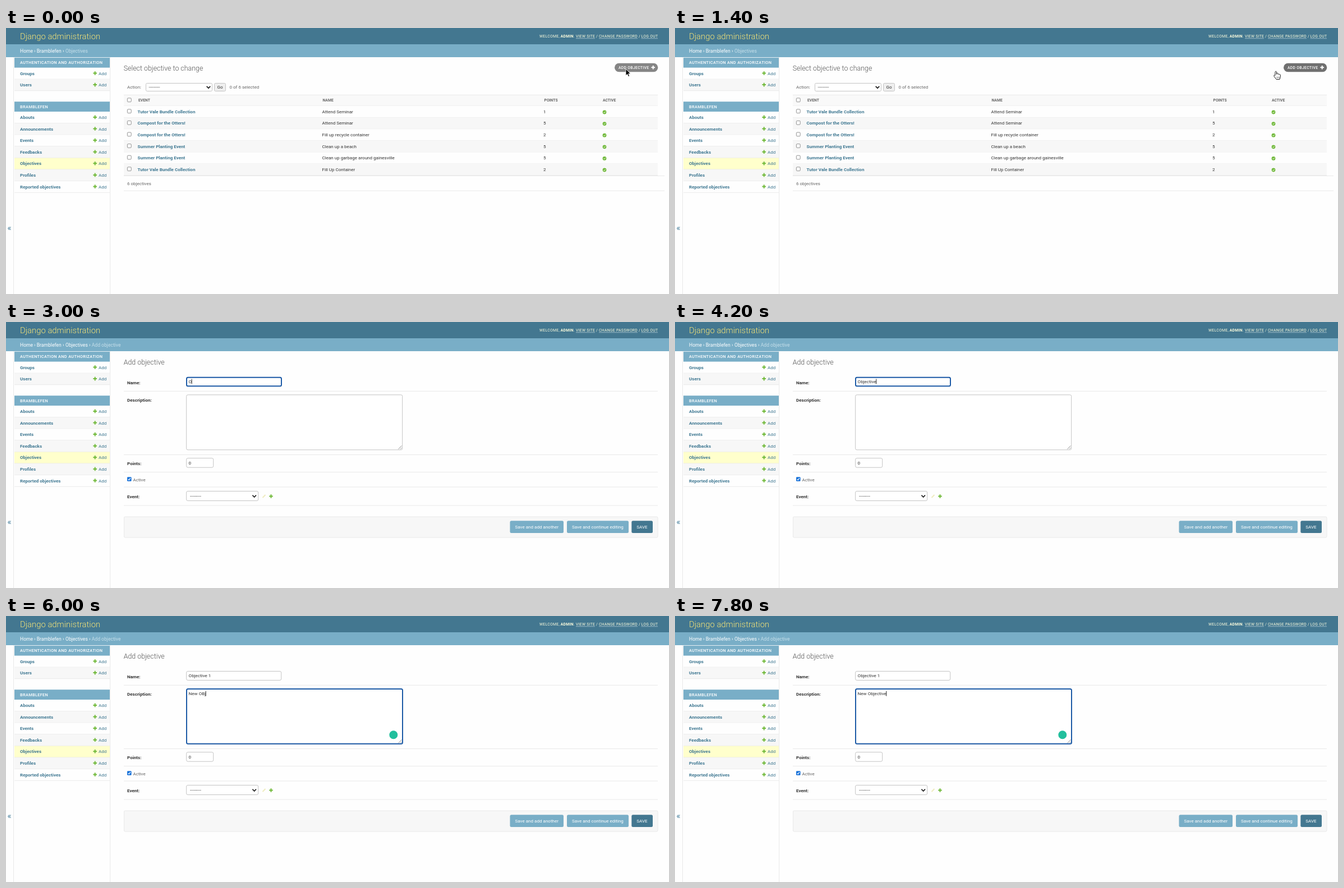
These frames come from a looping animation (1182 by 474 pixels, 8000 ms). An HTML page:

```html
<!DOCTYPE html>
<html lang="en">
<head>
<meta charset="utf-8">
<title>Add objective</title>
<style>
  html, body { margin: 0; width: 100%; height: 100%; overflow: hidden; background: #fefefe; }
  svg { display: block; width: 100%; height: 100%; }
  text { font: 8.05px Roboto, sans-serif; fill: #333; white-space: pre; }
  .bold { font-weight: 700; }
  .link { fill: #3f7892; }
  .gray { fill: #666; }
  .brand { font-size: 14.85px; font-weight: 300; fill: #f5e478; }
  .title { font-size: 12.4px; font-weight: 300; fill: #555; }
  .crumb { font-size: 8.6px; fill: #fff; }
  .faded { fill: #c6dfea; }
  .caption { font-size: 7.4px; font-weight: 500; letter-spacing: .31px; fill: #fff; }
  .user { font-size: 6.8px; letter-spacing: .31px; fill: #ffffdf; }
  .head { font-size: 6.8px; font-weight: 700; fill: #666; }
  .tool { font-size: 6.8px; font-weight: 500; letter-spacing: .31px; fill: #fff; }
  .white { fill: #fff; }
  .toggle { font-size: 15px; fill: #447e9b; }
</style>
</head>
<body>
<svg id="stage" viewBox="0 0 1182 474" preserveAspectRatio="none"></svg>
<script>
const BLUE = '#79aec7', DARK = '#437790', LINE = '#e9e9e9', GREEN = '#70b93a';
const STEP = 200, LOOP = 8000, ROW = 20.6;

const text = (x, y, s, cls = '') => `<text x="${x}" y="${y}" class="${cls}">${s}</text>`;
const box = (x, y, w, h, fill, stroke = 'none', r = 0, extra = '') =>
  `<rect x="${x}" y="${y}" width="${w}" height="${h}" rx="${r}" fill="${fill}" stroke="${stroke}" ${extra}/>`;
const path = (d, stroke, width = 1, extra = 'fill="none"') =>
  `<path d="${d}" stroke="${stroke}" stroke-width="${width}" ${extra}/>`;
const rule = (x1, x2, y, color = LINE) => path(`M${x1} ${y}H${x2}`, color);
const plus = (x, y, color = GREEN) => path(`M${x - 3.3} ${y}h6.6M${x} ${y - 3.3}v6.6`, color, 2);
const chevron = (x, y) => path(`M${x - 3.3} ${y - 1.7}l3.3 3.4 3.3 -3.4`, '#222', 1.7);
const checkbox = y => box(216.4, y - 3.4, 6.8, 6.8, '#fff', '#777', 1.3, 'stroke-width=".8"');
const field = (x, y, w, h) => box(x, y, w, h, '#fff', '#c4c4c4', 2.5);
const group = (id, content) => `<g id="${id}">${content}</g>`;

function sidebarSection(top, name, items) {
  const start = top + 18;
  const rows = items.map((item, i) => {
    const y = start + i * ROW;
    const fill = item === 'Objectives' ? '#ffffcc' : i % 2 ? '#f7f7f7' : '#fefefe';
    return box(15, y, 170, ROW, fill) + rule(15, 185, y + ROW - .2) +
      text(25, y + 12.7, item, 'bold link') + plus(158.7, y + 9.7) + text(165, y + 12.7, 'Add', 'link');
  });
  return box(15, top, 170, 18, BLUE) + text(25, top + 11.5, name, 'caption') + rows.join('');
}

const userLink = (x, end, s) => text(x, 16.7, s, 'user') + rule(x, end, 18.7, '#9bb9c5');

const frame = [
  box(0, 0, 1182, 29, DARK), box(0, 29, 1182, 23, BLUE),
  text(25, 19.8, 'Django administration', 'brand'),
  text(951, 16.7, 'WELCOME,', 'user'), text(988.7, 16.7, 'ADMIN', 'user bold'), text(1012, 16.7, '.', 'user'),
  userLink(1016, 1050, 'VIEW SITE'), text(1052, 16.7, '/', 'user'),
  userLink(1057, 1126, 'CHANGE PASSWORD'), text(1128, 16.7, '/', 'user'), userLink(1132.5, 1162, 'LOG OUT'),
  text(25, 44, 'Home', 'crumb'), text(50, 44, '›', 'crumb'),
  text(54.7, 44, 'Bramblefen', 'crumb'), text(101, 44, '›', 'crumb'),
  path('M13.5 52V474M185.7 52V474', LINE), text(2.5, 360.5, '«', 'toggle'),
  sidebarSection(52.8, 'AUTHENTICATION AND AUTHORIZATION', ['Groups', 'Users']),
  sidebarSection(131.2, 'BRAMBLEFEN',
    ['Abouts', 'Announcements', 'Events', 'Feedbacks', 'Objectives', 'Profiles', 'Reported objectives'])
].join('');

const objectives = [
  ['Tutor Vale Bundle Collection', 'Attend Seminar', 1],
  ['Compost for the Otters!', 'Attend Seminar', 5],
  ['Compost for the Otters!', 'Fill up recycle container', 2],
  ['Summer Planting Event', 'Clean up a beach', 5],
  ['Summer Planting Event', 'Clean up garbage around gainesville', 5],
  ['Tutor Vale Bundle Collection', 'Fill Up Container', 2]
].map(([event, name, points], i) => {
  const y = 139 + i * ROW;
  return box(210, y, 952, ROW, i % 2 ? '#f7f7f7' : '#fefefe') + rule(210, 1162, y + ROW) + checkbox(y + 9.2) +
    text(234.5, y + 12.8, event, 'bold link') + text(563.5, y + 12.8, name) + text(958, y + 12.8, points) +
    `<circle cx="1067" cy="${y + 11}" r="3.4" fill="${GREEN}"/>` + path(`M1065.3 ${y + 11}l1.3 1.3 2.2-2.4`, '#fff', 1);
}).join('');

const listPage = [
  text(106, 44, 'Objectives', 'crumb faded'),
  text(209.7, 76, 'Select objective to change', 'title'),
  box(1085, 62.8, 77.3, 15.4, '#858585', 'none', 7.7, 'id="addButton"'),
  text(1092, 73, 'ADD OBJECTIVE', 'tool'), plus(1153.7, 70.2, '#fff'),
  text(216, 108.2, 'Action:', 'gray'), box(249.5, 98.5, 118, 14, '#fff', '#c4c4c4', 2),
  text(254.5, 108, '---------'), chevron(361, 105.5),
  box(371.5, 98.5, 20, 14, '#efefef', '#c4c4c4', 2), text(376.5, 108.2, 'Go'),
  text(398.5, 108.2, '0 of 6 selected', 'gray'),
  box(210, 119, 952, 20, '#f9f9f9'), rule(210, 1162, 119.3), rule(210, 1162, 139), checkbox(128.3),
  text(236, 131.2, 'EVENT', 'head'), text(564.5, 131.2, 'NAME', 'head'),
  text(959.5, 131.2, 'POINTS', 'head'), text(1064, 131.2, 'ACTIVE', 'head'),
  objectives, rule(210, 1174, 263.4), text(216, 279.6, '6 objectives', 'gray'), rule(210, 1174, 290)
].join('');

const button = (x, w, s, fill = BLUE) => box(x, 354.3, w, 21.7, fill, 'none', 2.5) + text(x + 9, 368, s, 'white');

const formPage = [
  text(106, 44, 'Objectives', 'crumb'), text(148, 44, '›', 'crumb'), text(152.7, 44, 'Add objective', 'crumb faded'),
  text(209.7, 76, 'Add objective', 'title'),
  ...[123.3, 236.5, 267.5, 294, 327].map(y => rule(210, 1162, y)),
  text(216, 110.7, 'Name:', 'bold'), field(321.7, 98.5, 169, 16),
  text(216, 142.2, 'Description:', 'bold'), field(321.7, 129.8, 385, 98),
  path('M699.5 226.5l6-6M703 226.5l2.5-2.5', '#777', .8),
  text(216, 255, 'Points:', 'bold'), field(321.7, 242.7, 48, 16.5), text(325.6, 254, '0'),
  box(216, 276.2, 7.6, 7.6, '#1a73d9', 'none', 1.4), path('M217.7 280.1l1.5 1.6 2.8-3.5', '#fff', 1.2),
  text(226.5, 283.8, 'Active', 'gray'),
  text(216, 313.7, 'Event:', 'bold'), field(321.7, 301.5, 128, 17), text(328, 313, '---------'), chevron(442.7, 310.3),
  group('pencil', path('M457.5 313l5-5', '#efecc0', 2)), group('addEvent', plus(464, 310.5)),
  box(210.5, 347, 951.5, 37, '#f7f7f7', LINE, 2),
  button(898.5, 95.5, 'Save and add another'), button(1000, 110, 'Save and continue editing'),
  button(1115.3, 37.7, 'SAVE', DARK),
  box(322, 98.7, 169, 15.6, 'none', '#1c5aa6', 2.5, 'id="nameFocus" stroke-width="2"'),
  group('descriptionFocus', box(322, 130, 385, 97.8, 'none', '#1c5aa6', 2.5, 'stroke-width="2"') +
    '<circle cx="690.8" cy="211.8" r="7.5" fill="#22bf9d"/>'),
  '<text id="nameText" x="325.6" y="108.8"/><text id="descriptionText" x="325.6" y="141"/>',
  '<path id="caret" d="M0 0v9" stroke="#111" stroke-width=".9"/>'
].join('');

const outline = 'stroke-linejoin="round"';
const pointers = [
  group('arrow', path('M0 0V11.8L2.7 9.3 4.5 13.5 6.5 12.6 4.7 8.5H8.4Z', '#fff', .8, outline + ' fill="#000"')),
  group('hand', path('M-1 1C-1-.8 1.4-.8 1.4 1V5C2-.2 4 4 4 5 4.5 3.8 6 4.2 6.2 5.5 7 4.6 8.3 5 8.3 6.4V9.5L7 14H1L-3.2 8.3C-4 7-2.4 6-1.2 7.3Z',
    '#222', 1, outline + ' fill="#fff"') + path('M2 9.3v2.6M4 9.3v2.6M6 9.3v2.6', '#222', .6)),
  group('beam', path('M-2-5Q0-5 0-3.5Q0-5 2-5M0-3.5V3.5M-2 5Q0 5 0 3.5Q0 5 2 5', '#333', .9))
].join('');

const stage = document.getElementById('stage');
stage.innerHTML = frame + group('listPage', listPage) + group('formPage', formPage) + group('pointer', pointers);
const part = Object.fromEntries([...stage.querySelectorAll('[id]')].map(el => [el.id, el]));
const show = (el, on) => el.setAttribute('display', on ? 'inline' : 'none');

// time, x, y of the pointer
const route = [[0, 1105, 73], [200, 1108, 71], [1200, 1107, 71], [1400, 1071, 77.5],
  [1600, 650, 94], [1800, 470, 104], [2000, 400, 107], [3000, 400, 107]];

function pointerAt(t) {
  const i = Math.max(1, route.findIndex(p => p[0] >= t));
  const [t0, x0, y0] = route[i - 1], [t1, x1, y1] = route[i];
  const k = (t - t0) / (t1 - t0);
  return [x0 + (x1 - x0) * k, y0 + (y1 - y0) * k];
}

const typed = (s, t, start, perStep) => t < start ? '' : s.slice(0, 1 + Math.floor((t - start) / STEP * perStep));

function describe(t) {
  if (t <= 6000) return typed('New OBj', t, 5200, 1.5);
  if (t < 6600) return 'New OBj'.slice(0, 7 - (t - 6000) / STEP);
  return 'New O' + typed('bjective', t, 6600, 1.8);
}

function render(t) {
  const onForm = t >= 1600, inDescription = t >= 4800;
  show(part.listPage, !onForm);
  show(part.formPage, onForm);
  part.addButton.setAttribute('fill', t < 200 ? '#858585' : '#707070');

  show(part.pencil, t >= 1800);
  part.addEvent.setAttribute('transform', `translate(${t >= 1800 ? 8.5 : 0})`);
  show(part.nameFocus, t >= 2200 && !inDescription);
  show(part.descriptionFocus, inDescription);
  part.nameText.textContent = typed('Objective 1', t, 3000, 1.4);
  part.descriptionText.textContent = describe(t);

  const active = inDescription ? part.descriptionText : part.nameText;
  const caretX = 325.6 + (active.textContent ? active.getComputedTextLength() : 0);
  show(part.caret, t >= 2200 && t !== 5000);
  part.caret.setAttribute('transform', `translate(${caretX} ${inDescription ? 133.7 : 101.5})`);

  show(part.pointer, t < 3000);
  if (t < 3000) part.pointer.setAttribute('transform', `translate(${pointerAt(t)})`);
  show(part.arrow, t < 200 || t === 1600);
  show(part.hand, t >= 200 && t < 1600);
  show(part.beam, t >= 1800);
}

const origin = performance.now();
let shown = -1;
function tick() {
  const t = Math.floor(Math.max(0, performance.now() - origin) % LOOP / STEP) * STEP;
  if (t !== shown) render(shown = t);
  requestAnimationFrame(tick);
}
tick();
</script>
</body>
</html>
```
